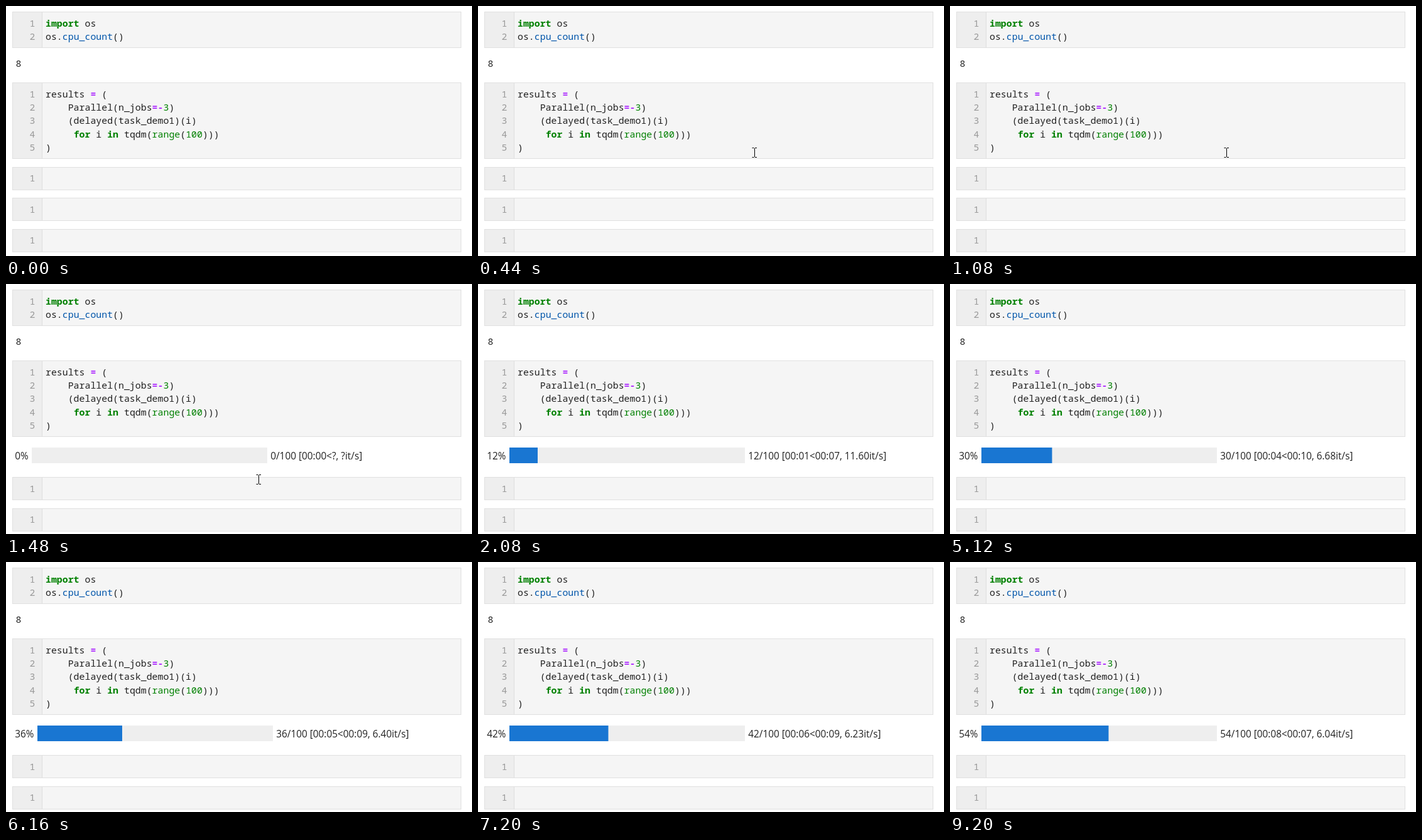
Recreate the animation shown at these times as an HTML page. Size 742x399 px, loop 9.64 s.

```html
<!DOCTYPE html>
<html lang="en">
<head>
<meta charset="utf-8">
<title>Parallel progress bar</title>
<style>
  html, body { margin: 0; width: 100%; height: 100%; overflow: hidden; background: #fff; }
  svg { display: block; width: 742px; height: 399px; }
  text { fill: #212121; white-space: pre; }
  .code { font: 14.883px "Noto Sans Mono", "DejaVu Sans Mono", monospace; }
  .label { font: 15.37px "Open Sans", "Noto Sans", sans-serif; }
  .num { fill: #999; text-anchor: middle; }
  .kw { fill: #008000; font-weight: bold; }
  .op { fill: #aa22ff; font-weight: bold; }
  .lit { fill: #008000; }
  .prop { fill: #0055aa; }
  .box { fill: #f5f5f5; stroke: #e0e0e0; }
  .focus .box { fill: #fff; stroke: #1976d2; }
</style>
</head>
<body>
<svg viewBox="0 0 742 399">
  <g id="cells" class="code"></g>
  <text class="code" x="15.5" y="97">8</text>
  <g id="progress" class="label">
    <text id="percent" x="14.2" y="280"></text>
    <g id="meter">
      <rect x="50" y="261" width="375" height="25" fill="#eee"/>
      <rect id="fill" x="50" y="261" height="25" fill="#1976d2"/>
      <text id="stats" x="430.2" y="280"></text>
    </g>
  </g>
  <path id="pointer" fill="none" stroke="#000"
        d="M-3.5-7.5H-.5M1-7.5H4M.5-7V7M-3.5 7.5H-.5M1 7.5H4"/>
</svg>
<script>
const LOOP = 9640, RUN = 1120;
const $ = id => document.getElementById(id);
const span = (cls, s) => `<tspan class="${cls}">${s}</tspan>`;
const kw = s => span("kw", s), op = s => span("op", s), lit = s => span("lit", s);

// Each cell: top, height, baselines of its lines, code
const cells = [
  [9, 58, [33, 54], [kw("import") + " os", "os." + span("prop", "cpu_count") + "()"]],
  [122, 122, [146, 167, 188, 210, 231], [
    `results ${op("=")} (`,
    `    Parallel(n_jobs${op("=-")}${lit("3")})`,
    "    (delayed(task_demo1)(i)",
    `     ${kw("for")} i ${kw("in")} tqdm(${lit("range")}(${lit("100")})))`,
    ")"
  ]],
  [257, 37, [280], [""]],
  [306, 37, [330], [""]],
  [356, 37, [379], [""]]
];

$("cells").innerHTML = cells.map(([y, h, base, code]) => `<g>
  <rect class="box" x="10.5" y="${y + .5}" width="714" height="${h - 1}"/>
  <rect x="11" y="${y + 1}" width="46" height="${h - 2}" fill="#eee"/>
  <rect x="57" y="${y + 1}" width="1" height="${h - 2}" fill="#ddd"/>
  ${base.map((b, i) => `<text class="num" x="42" y="${b}">${i + 1}</text>
  <text x="63" y="${b}">${code[i]}</text>`).join("")}</g>`).join("");
const [, job, spare, ...below] = $("cells").children;

// Bar time, text time, items done, elapsed and remaining seconds, rate
const updates = [
  [RUN, RUN, 0],
  [2080, 2080, 12, 1, 7, "11.60"],
  [3120, 3120, 18, 2, 9, "8.29"],
  [4120, 4120, 24, 3, 10, "7.20"],
  [5120, 5120, 30, 4, 10, "6.68"],
  [6120, 6160, 36, 5, 9, "6.40"],
  [7160, 7200, 42, 6, 9, "6.23"],
  [8160, 8160, 48, 7, 8, "6.12"],
  [9160, 9200, 54, 8, 7, "6.04"]
];
const latest = (t, col) => updates.filter(u => u[col] <= t).pop() || updates[0];
const clock = s => "00:" + String(s).padStart(2, "0");
const describe = ([, , n, spent, left, rate]) => n
  ? `${n}/100 [${clock(spent)}<${clock(left)}, ${rate}it/s]`
  : "0/100 [00:00<?, ?it/s]";

const show = (el, on) => el.setAttribute("visibility", on ? "visible" : "hidden");
const move = (el, x, y) => el.setAttribute("transform", `translate(${x} ${y})`);

// The pointer glides in from below, rests, then leaves at the lower left
function pointerAt(t) {
  if (t < 40 || t >= 1600) return null;
  if (t >= 1560) return [351, 391];
  if (t >= 1480) return [402, 312];
  const p = Math.min(1, Math.floor((t - 40) / 40) / 8);
  const rest = (1 - p) ** 2;
  return [Math.round(440 - 30 * rest), Math.round(234 + 131 * rest)];
}

function draw(t) {
  const running = t >= RUN;
  job.classList.toggle("focus", t >= 520 && t < 1080);
  show(spare, !running);
  below.forEach(cell => move(cell, 0, running ? 2 : 0));

  show($("progress"), running);
  const text = latest(t, 1);
  $("fill").setAttribute("width", 3.75 * latest(t, 0)[2]);
  $("percent").textContent = text[2] + "%";
  $("stats").textContent = describe(text);
  move($("meter"), text[2] ? 0 : -9, 0);

  const at = pointerAt(t);
  show($("pointer"), at);
  if (at) move($("pointer"), ...at);
}

function tick() {
  draw(performance.now() % LOOP);
  requestAnimationFrame(tick);
}
tick();
</script>
</body>
</html>
```
